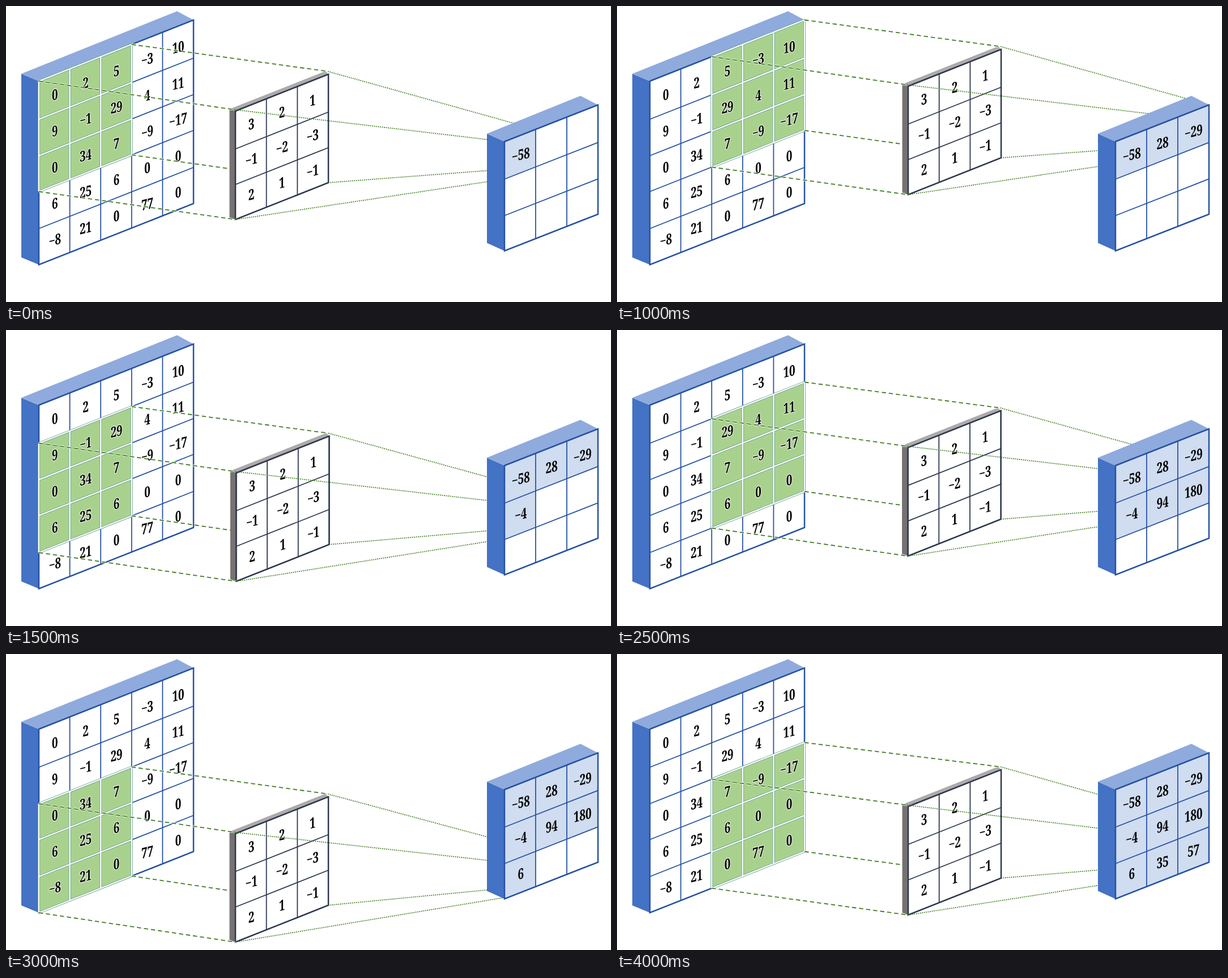
Write an HTML page that moves like this. It is 1068 by 524 pixels and loops after 4.5 s.

```html
<!DOCTYPE html>
<html lang="en">
<head>
<meta charset="utf-8">
<title>Convolution</title>
<style>
  html, body { margin: 0; width: 100%; height: 100%; overflow: hidden; background: #fff; }
  svg { display: block; width: 100vw; height: 100vh; }
  text { font: bold 26px "Noto Serif", serif; text-anchor: middle; fill: #000; }
  .halo text { stroke: #f4faef; stroke-width: 2.4px; paint-order: stroke; stroke-linejoin: round; }
</style>
</head>
<body>
<svg id="stage" viewBox="0 0 1068 524"></svg>
<script>
const STEP = 500, COUNT = 9;
const stage = document.getElementById('stage');

// Each board: front face corner, column step, row line offsets, first number's centre and its steps.
const input = {
  x: 58, y: 133, dx: 54.6, dy: -21.65, rows: [0, 67.5, 132, 195.5, 261, 325],
  text: [86.3, 157, 54.4, -21, 64.2],
  values: [[0, 2, 5, -3, 10], [9, -1, 29, 4, 11], [0, 34, 7, -9, -17], [6, 25, 6, 0, 0], [-8, 21, 0, 77, 0]],
  line: '#2652a3', side: '#4472c4', top: '#8faadc', back: [-31, -13], rise: [-29, -15.5]
};
const kernel = {
  x: 405, y: 186, dx: 54.7, dy: -21.75, rows: [0, 67, 130, 192],
  text: [433.3, 209, 54, -21, 62.4],
  values: [[3, 2, 1], [-1, -2, -3], [2, 1, -1]],
  line: '#2c3850', side: '#767272', top: '#aeaaaa', back: [-10.5, -3.5], rise: [-5, -5.5]
};
const output = {
  x: 880, y: 240, dx: 55, dy: -21.65, rows: [0, 66.5, 131, 193.5],
  text: [908.8, 263, 54.5, -20.5, 63],
  values: [[-58, 28, -29], [-4, 94, 180], [6, 35, 57]],
  line: '#2652a3', side: '#4472c4', top: '#8faadc', back: [-31, -14], rise: [-31, -16]
};

// Kernel offset at the start of each sweep, and its step per column.
const sweeps = [
  { x: 0, y: 0, dx: 54.5, dy: -22 },
  { x: 1.4, y: 67, dx: 53.6, dy: -22.4 },
  { x: 0, y: 132, dx: 54.5, dy: -24 }
];

const at = (b, c, r) => [b.x + b.dx * c, b.y + b.dy * c + b.rows[r]];
const add = (p, q) => [p[0] + q[0], p[1] + q[1]];
const poly = (pts, attrs) => `<polygon points="${pts.join(' ')}" ${attrs}/>`;
const line = (p, q, attrs) =>
  `<line x1="${p[0]}" y1="${p[1]}" x2="${q[0]}" y2="${q[1]}" ${attrs}/>`;
const area = (b, c, r, w, h) => [at(b, c, r), at(b, c + w, r), at(b, c + w, r + h), at(b, c, r + h)];

function number(b, c, r) {
  const [x, y, dx, dy, step] = b.text;
  const label = String(b.values[r][c]).replace('-', '\u2212');
  return `<text transform="matrix(.72 -.18 0 1 ${x + dx * c} ${y + dy * c + step * r})" y="9.2">${label}</text>`;
}

function numbers(b, visible = () => true) {
  return b.values.map((row, r) => row.map((_, c) => visible(c, r) ? number(b, c, r) : '').join('')).join('');
}

function grid(b, c0, r0, w, h, attrs) {
  let s = '';
  for (let c = 0; c <= w; c++) s += line(at(b, c0 + c, r0), at(b, c0 + c, r0 + h), attrs);
  for (let r = 0; r <= h; r++) s += line(at(b, c0, r0 + r), at(b, c0 + w, r0 + r), attrs);
  return s;
}

function board(b, fills = '') {
  const n = b.rows.length - 1;
  const [tl, tr, br, bl] = area(b, 0, 0, n, n);
  return poly([tl, add(tl, b.back), add(bl, b.back), bl], `fill="${b.side}"`)
    + poly([tl, add(tl, b.back), add(tr, b.rise), tr], `fill="${b.top}"`)
    + poly([tl, tr, br, bl], 'fill="#fff"') + fills
    + grid(b, 0, 0, n, n, `stroke="${b.line}" stroke-width="1.8"`)
    + poly([tl, tr, br, bl], `fill="none" stroke="${b.line}" stroke-width="2.5"`);
}

function dashed(p, q) {
  const dash = 'stroke-dasharray="7.5 5"';
  return line(p, q, `stroke="#fff" stroke-opacity=".75" stroke-width="4" ${dash}`)
    + line(p, q, `stroke="#417d24" stroke-width="1.8" ${dash}`);
}

const dotted = (p, q) => line(p, q, 'stroke="#417d24" stroke-width="1.8" stroke-dasharray="1.8 1.7"');

function scene(k) {
  const col = k % 3, row = Math.floor(k / 3);
  const sweep = sweeps[row];
  const [mx, my] = [sweep.x + sweep.dx * col, sweep.y + sweep.dy * col];
  const [tx, ty, ...steps] = kernel.text;
  const mask = { ...kernel, x: kernel.x + mx, y: kernel.y + my, text: [tx + mx, ty + my, ...steps] };

  const from = area(input, col, row, 3, 3);
  const via = area(mask, 0, 0, 3, 3);
  const to = area(output, col, row, 1, 1).map(p => add(p, [0, -1.2 * row]));
  via[0] = add(via[0], [-2, -2.5]);
  via[1] = add(via[1], [-1, -5]);

  const inside = (c, r) => c >= col && c < col + 3 && r >= row && r < row + 3;
  const done = (c, r) => r * 3 + c <= k;
  let fills = '';
  for (let i = 0; i <= k; i++)
    fills += poly(area(output, i % 3, Math.floor(i / 3), 1, 1), 'fill="#d0dcf0"');

  return board(input)
    + poly(from, 'fill="#a9d18e"')
    + grid(input, col, row, 3, 3, 'stroke="#6a9f92" stroke-width="4"')
    + grid(input, col, row, 3, 3, 'stroke="#fff" stroke-width="2.3"')
    + numbers(input, (c, r) => !inside(c, r))
    + `<g class="halo">${numbers(input, inside)}</g>`
    + dashed(from[2], via[2])
    + board(mask) + numbers(mask)
    + [0, 1, 3].map(i => dashed(from[i], via[i])).join('')
    + via.map((p, i) => dotted(p, to[i])).join('')
    + board(output, fills) + numbers(output, done);
}

const scenes = Array.from({ length: COUNT }, (_, k) => scene(k));
const start = performance.now();
let shown = -1;

function draw(now) {
  const k = Math.floor(Math.max(0, now - start) / STEP) % COUNT;
  if (k !== shown) stage.innerHTML = scenes[shown = k];
  requestAnimationFrame(draw);
}
draw(start);
</script>
</body>
</html>
```
